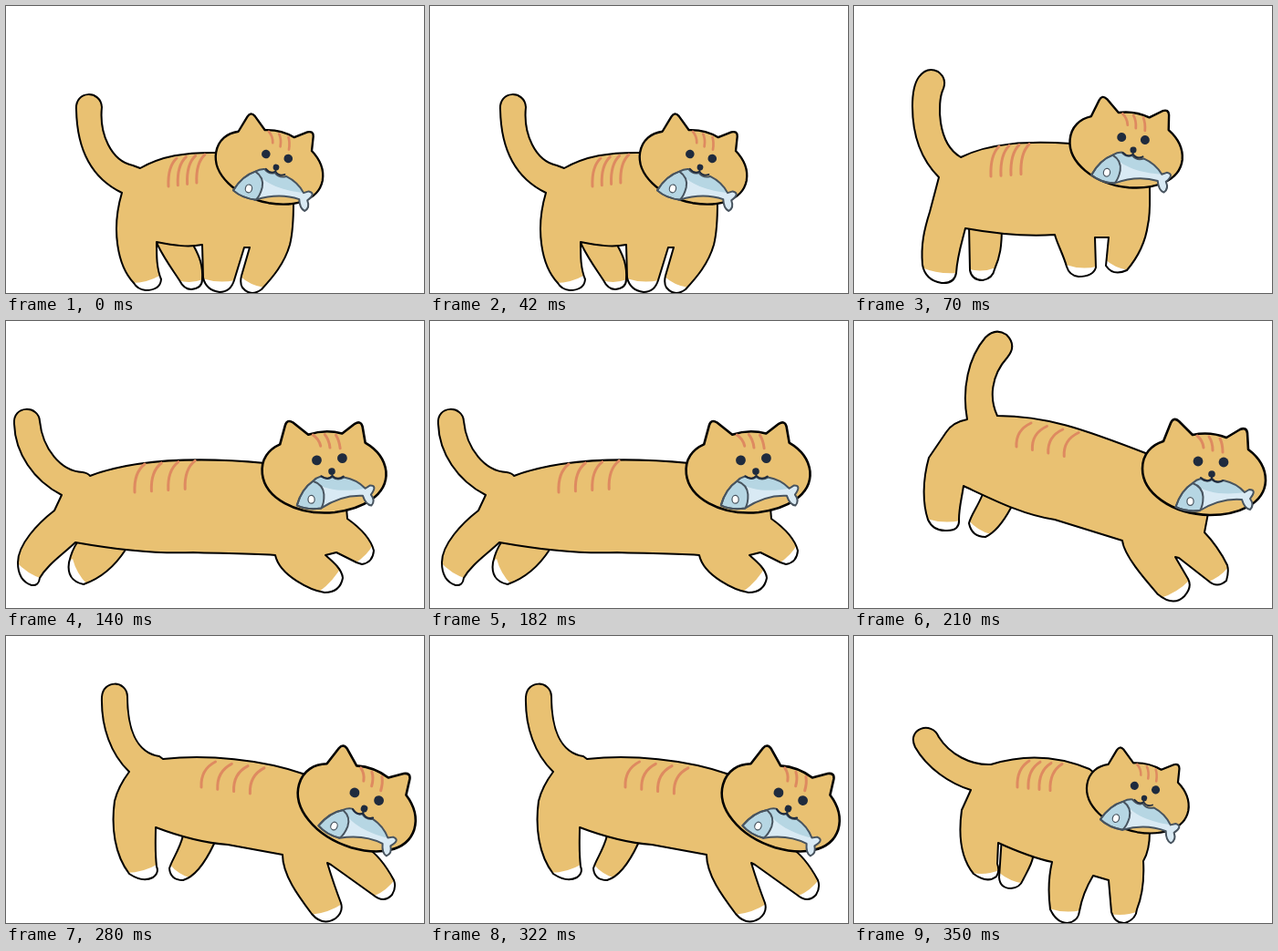
Animation of 458 by 315 pixels, one loop 0.42 s. Source, as an HTML page with a canvas:

```html
<!DOCTYPE html>
<html lang="en">
<head>
<meta charset="utf-8">
<title>Running cat with a fish</title>
<style>
html, body { margin: 0; width: 100%; height: 100%; overflow: hidden; background: #fff; }
canvas { display: block; }
</style>
</head>
<body>
<canvas id="stage" width="458" height="315"></canvas>
<script>
const ctx = document.getElementById('stage').getContext('2d');
const STEP = 70;
const FUR = '#e9c172', STRIPE = '#de8a60', INK = '#1f2b3e', EDGE = '#48545f';
const PALE = '#d9eaf4', BLUE = '#b6d6e3';

// leg: far hind leg; paws: white tips as lines [x1, y1, x2, y2], white on the right-hand side
// marks: first stripe x, y, step x, y, rise x, y
// head: nose x, y, angle, scale, fish angle
const poses = [
  {
    leg: 'M164,250 L166,262 C175,280 183,290 190,301 Q195,311 203,311 Q215,310 215,300 C216,285 212,275 206,264 L206,250',
    body: 'M127,205 C100,192 78,165 77,114 C75,92 104,92 105,111 C102,140 115,170 139,175 L147,178 C170,165 195,160 235,161 L290,180 L315,215 C315,235 314,250 311,262 C305,283 292,298 280,311 Q268,320 259,309 Q256,304 258,296 L267,265 L261,265 L250,301 Q246,314 234,314 Q219,312 216,298 L215,262 C200,265 185,263 165,259 C165,275 165,288 170,300 Q169,312 153,312 Q144,311 140,304 C122,285 115,245 127,205',
    legPaw: [188, 301, 216, 300],
    paws: [[137, 304, 170, 295], [215, 299, 251, 301], [256, 296, 283, 309]],
    marks: [178, 198, 10.3, -1.3, 9, 31],
    head: [296, 177, 9.3, .89, 14]
  },
  {
    leg: 'M126,240 L127,290 Q129,301 141,301 Q152,299 154,289 C160,275 162,265 162,240',
    body: 'M93,188 C75,170 64,145 64,110 C64,95 66,85 71,78 Q80,66 92,72 Q103,80 97,93 C92,105 90,150 117,166 C150,150 190,148 238,151 L290,165 L324,196 C324,215 325,228 322,240 C319,262 310,277 299,290 Q284,297 276,285 L279,254 L264,254 L265,287 Q262,297 246,297 Q236,296 233,286 C229,272 223,262 220,251 C190,253 155,250 122,244 C118,260 113,275 112,293 Q110,305 96,304 Q78,301 75,284 C73,262 77,245 83,226 L93,188',
    legPaw: [126, 289, 156, 287],
    paws: [[74, 287, 113, 293], [232, 284, 266, 286], [274, 277, 301, 290]],
    marks: [150, 187, 11, -.8, 9, 33],
    head: [306, 158, 4.5, .922, 11.5]
  },
  {
    leg: 'M90,235 L78,243 Q72,252 69,265 Q66,285 85,289 C105,282 120,268 131,251 L131,235',
    body: 'M61,191 C30,175 10,145 9,113 C7,92 36,92 37,110 C40,140 60,165 84,166 Q90,167 92,170 C140,152 210,149 284,156 L340,180 L373,205 L374,217 C388,227 400,240 403,252 Q402,265 390,267 L384,265 L362,254 L350,257 C358,264 368,272 369,282 Q366,298 349,298 C335,296 300,280 295,257 C260,255 230,255 205,254 C160,256 110,249 76,243 C60,258 45,268 37,282 Q36,291 28,290 Q13,285 13,265 C13,245 35,222 53,208 L61,191',
    legPaw: [73, 261, 90, 290],
    paws: [[11, 264, 40, 283], [342, 298, 369, 267], [382, 266, 404, 242]],
    marks: [141, 188, 18.4, -1.2, 11, 31],
    head: [357, 165, -6.6, 1, -2]
  },
  {
    leg: 'M145,182 L141,190 C135,205 128,213 126,222 Q129,237 144,237 C155,232 165,218 172,205 L172,195',
    body: 'M124,108 C118,75 125,40 144,18 Q155,7 167,15 Q179,27 168,40 C150,60 148,85 157,104 C210,104 250,118 322,146 L370,170 L388,211 L384,232 C392,240 403,255 409,268 Q411,275 408,285 Q398,294 388,285 L356,260 L352,259 L366,283 Q371,292 362,302 Q350,314 333,300 C320,285 296,258 294,241 L220,218 C185,213 150,195 120,181 C118,195 115,205 115,218 Q116,230 102,230 Q87,231 81,218 C75,200 75,175 82,150 L101,122 Q108,111 124,108',
    legPaw: [125, 218, 150, 234],
    paws: [[79, 217, 117, 219], [336, 304, 368, 284], [386, 287, 411, 269]],
    marks: [178, 138, 17.4, 3.5, 16, 26],
    head: [392, 168, 0, 1, 0]
  },
  {
    leg: 'M198,210 L194,219 C190,235 182,245 179,255 Q180,268 194,268 C208,264 220,245 228,228 L228,215',
    body: 'M135,149 C115,130 104,100 105,67 C106,48 132,48 133,66 C133,100 142,128 168,132 L172,135 C220,130 280,135 328,152 L370,180 L395,232 C408,240 418,255 425,268 Q428,276 423,284 Q414,294 402,284 L356,251 L352,249 C356,262 360,275 367,293 Q370,303 361,310 Q347,319 335,305 C320,285 303,262 303,240 L243,229 C215,227 185,218 164,210 C164,225 163,235 165,253 Q168,260 161,265 Q150,271 135,261 C119,240 115,210 119,181 Q123,165 135,149',
    legPaw: [178, 249, 203, 266],
    paws: [[132, 260, 167, 250], [334, 306, 370, 293], [402, 286, 427, 266]],
    marks: [214, 166, 17.8, 2.3, 15.5, 28],
    head: [392.5, 189.5, 16, 1, 22]
  },
  {
    leg: 'M162,220 L159,265 Q160,277 172,277 Q182,276 185,268 C190,258 195,250 196,243 L196,230',
    body: 'M128,169 C105,162 80,145 67,122 C57,102 85,92 93,111 C105,130 128,142 150,141 C185,130 220,130 258,146 L300,180 L324,215 C324,227 323,237 317,247 C318,265 316,285 310,300 Q309,311 297,315 Q286,316 282,303 L279,268 L262,263 C256,273 250,285 247,302 Q246,313 234,315 Q222,315 215,300 C213,285 213,265 217,248 C198,244 180,237 158,227 L157,250 Q160,258 156,264 Q146,272 131,261 C118,245 114,220 118,191 L128,169',
    legPaw: [158, 259, 187, 272],
    paws: [[129, 260, 159, 257], [213, 299, 249, 301], [280, 305, 312, 302]],
    marks: [179, 166, 12, 1.2, 13, 29],
    head: [318, 178, 9, .845, 16.5]
  }
];

const skull = new Path2D('M-53,-36 L-45,-56 Q-42,-63 -36,-58 L-21,-43 Q-2,-47 16,-40 L31,-49 Q38,-52 39,-45 L40,-27 C52,-18 59,-6 59,7 C58,34 27,45 -2,45 C-45,44 -76,20 -76,-6 C-76,-22 -66,-32 -53,-36Z');
const brow = new Path2D('M-16,-42 Q-10,-37 -9,-29 M-3,-41 Q1,-35 1,-26 M9,-39 Q12,-33 12,-24');
const mouth = new Path2D('M0,0 V5 M-12,4 Q-5,10 0,5 Q5,11 12,7');
const fish = new Path2D('M-39.5,36 C-36,25 -29,15 -21,10 Q-17,6 -12,5 Q-5,10 0,6 Q6,11 13,7 Q27,10 36,20 L41,17 Q50,17 42,27 Q47,34 42,39 Q36,38 33,28 Q10,26 -13,40 Q-28,42 -39.5,36Z');
const back = new Path2D('M-21,10 Q-17,6 -12,5 Q-5,10 0,6 Q6,11 13,7 Q27,10 36,20 C22,22 -4,24 -21,10Z');
const face = new Path2D('M-39.5,36 C-36,25 -29,15 -21,10 Q-10,14 -9.5,25 Q-9.5,35 -13,40 Q-28,42 -39.5,36Z');

function fill(path, color) {
  ctx.fillStyle = color;
  ctx.fill(path);
}

function line(path, color, width) {
  ctx.strokeStyle = color;
  ctx.lineWidth = width;
  ctx.stroke(path);
}

function oval(x, y, rx, ry = rx) {
  const path = new Path2D();
  path.ellipse(x, y, rx, ry, 0, 0, 7);
  return path;
}

function paw([x1, y1, x2, y2]) {
  const dx = x2 - x1, dy = y2 - y1, k = 24 / Math.hypot(dx, dy);
  const nx = -dy * k, ny = dx * k;
  const path = new Path2D();
  path.moveTo(x1, y1);
  path.quadraticCurveTo((x1 + x2) / 2 + nx * .2, (y1 + y2) / 2 + ny * .2, x2, y2);
  path.lineTo(x2 + nx, y2 + ny);
  path.lineTo(x1 + nx, y1 + ny);
  fill(path, '#fff');
}

function limb(outline, paws) {
  const path = new Path2D(outline);
  fill(path, FUR);
  ctx.save();
  ctx.clip(path);
  paws.forEach(paw);
  ctx.restore();
  line(path, '#000', 2);
}

function stripes([x, y, sx, sy, dx, dy]) {
  const path = new Path2D();
  for (let i = 0; i < 4; i++, x += sx, y += sy) {
    path.moveTo(x, y);
    path.quadraticCurveTo(x - 1, y - dy * .7, x + dx, y - dy);
  }
  line(path, STRIPE, 3);
}

function place(x, y, angle, scale, draw) {
  ctx.save();
  ctx.translate(x, y);
  ctx.rotate(angle * Math.PI / 180);
  ctx.scale(scale, scale);
  draw();
  ctx.restore();
}

function drawSkull() {
  fill(skull, FUR);
  line(skull, '#000', 2.6);
  line(brow, STRIPE, 3);
}

function drawFish() {
  fill(fish, PALE);
  fill(back, BLUE);
  fill(face, BLUE);
  line(face, EDGE, 2);
  line(fish, EDGE, 2);
  const eye = oval(-23.5, 30, 3.6, 4.4);
  fill(eye, '#fff');
  line(eye, EDGE, 1.2);
}

function drawFace() {
  fill(oval(-15, -14, 5.4), INK);
  fill(oval(13, -13, 5.4), INK);
  fill(oval(0, 0, 3.8), INK);
  line(mouth, INK, 2);
}

function draw({ leg, legPaw, body, paws, marks, head }) {
  const [x, y, angle, scale, fishAngle] = head;
  ctx.fillStyle = '#fff';
  ctx.fillRect(0, 0, 458, 315);
  limb(leg, [legPaw]);
  limb(body, paws);
  stripes(marks);
  place(x, y, angle, scale, drawSkull);
  place(x, y, fishAngle, 1, drawFish);
  place(x, y, angle, scale, drawFace);
}

ctx.lineCap = ctx.lineJoin = 'round';
const start = performance.now();

function tick(now) {
  const step = Math.floor(Math.max(0, now - start) / STEP);
  draw(poses[step % poses.length]);
  requestAnimationFrame(tick);
}
tick(start);
</script>
</body>
</html>
```
